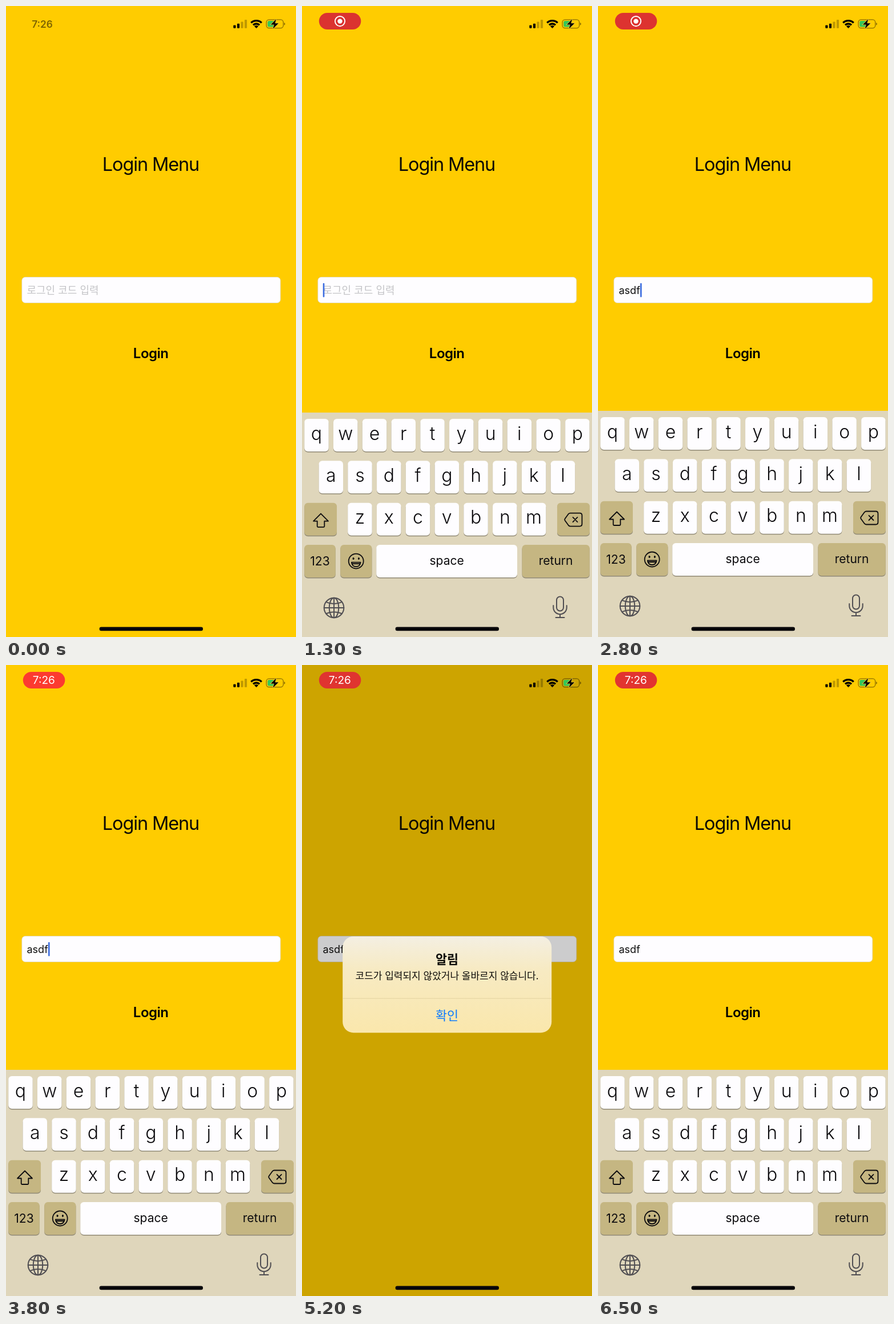
Recreate the animation shown at these times as an HTML page. Size 508x1102 px, loop 6600 ms.

```html
<!DOCTYPE html>
<html lang="ko">
<head>
<meta charset="utf-8">
<title>Login Menu</title>
<style>
  html, body { margin: 0; width: 100%; height: 100%; overflow: hidden; background: #fc0; }
  svg { display: block; width: 508px; height: 1102px; }
  text { font-family: Inter, Roboto, sans-serif; font-optical-sizing: none; }
  .ko { font-family: "Noto Sans CJK KR", "Noto Sans CJK", sans-serif; }
  .mid { text-anchor: middle; }
  .line { fill: none; stroke: #0c0b0e; stroke-width: 1.8; stroke-linejoin: round; stroke-linecap: round; }
  .tool { stroke: #504e52; stroke-width: 2; }
  .letter { font-size: 32px; font-weight: 300; }
  .label { font-size: 21px; }
</style>
</head>
<body>
<svg viewBox="0 0 508 1102">
  <defs>
    <linearGradient id="frost" x2="0" y2="1">
      <stop offset="0" stop-color="#f4efe2"/>
      <stop offset=".35" stop-color="#f7eac2"/>
      <stop offset="1" stop-color="#fae7ac"/>
    </linearGradient>
  </defs>

  <rect width="508" height="1102" fill="#fc0"/>
  <text class="mid" x="253.5" y="288" font-size="32.5" letter-spacing="-.035em" fill="#0c0a05">Login Menu</text>
  <rect x="27.8" y="473.5" width="453" height="45" rx="6" fill="#fefdff" stroke="#dcd6c4" stroke-width=".7"/>
  <text id="hint" class="ko" x="36.5" y="502.5" font-size="18" fill="#c4c4c7">로그인 코드 입력</text>
  <text id="typed" x="36.5" y="503" font-size="18" fill="#111"></text>
  <rect id="caret" y="484" width="2.6" height="24.5" rx="1" fill="#3a6ce0"/>
  <text id="login" class="mid" x="253.7" y="615" font-size="24" font-weight="600" letter-spacing="-.02em">Login</text>

  <rect id="dim" width="508" height="1102"/>

  <g id="keyboard">
    <rect y="707" width="508" height="395" fill="#dfd6bb"/>
    <g id="keys"></g>
    <path class="line" d="M33 883.5 46 896.5H39.3V905.5Q39.3 907 37.8 907H28.2Q26.7 907 26.7 905.5V896.5H20Z"/>
    <path class="line" d="M470 882.5H486.5Q490.5 882.5 490.5 886.5V901.5Q490.5 905.5 486.5 905.5H470Q468.3 905.5 467 904.2L460.6 895.5Q459.6 894 460.6 892.5L467 883.8Q468.3 882.5 470 882.5ZM474.5 889.8 482.5 898M482.5 889.8 474.5 898"/>
    <g class="line">
      <circle cx="94.7" cy="966.5" r="13"/>
      <path d="M86.8 968.5H102.6Q101.5 976 94.7 976T86.8 968.5ZM88 971H101.4"/>
      <ellipse cx="90" cy="962" rx="1" ry="1.7" fill="#0c0b0e" stroke-width="1"/>
      <ellipse cx="99.4" cy="962" rx="1" ry="1.7" fill="#0c0b0e" stroke-width="1"/>
    </g>
    <g class="line tool">
      <circle cx="56" cy="1048" r="17.3"/>
      <ellipse cx="56" cy="1048" rx="8.3" ry="17.3"/>
      <path d="M56 1030.7V1065.3M38.7 1048H73.3M42 1037.8Q56 1044 70 1037.8M42 1058.2Q56 1052 70 1058.2"/>
      <rect x="446" y="1028.5" width="12" height="25" rx="6"/>
      <path d="M440.3 1044V1047.5A11.7 11.7 0 0 0 463.7 1047.5V1044M452 1059.5V1065M444.5 1065H459.5"/>
    </g>
  </g>

  <g id="alert">
    <rect x="71.2" y="474" width="366" height="168.3" rx="19" fill="url(#frost)"/>
    <path d="M71.2 582.3H437.2" stroke="#e3d3a1" stroke-width="1.1"/>
    <text class="ko mid" x="254" y="521.8" font-size="21.8" font-weight="700" fill="#0d0c09">알림</text>
    <text class="ko mid" x="254" y="549.3" font-size="17" fill="#0d0c09">코드가 입력되지 않았거나 올바르지 않습니다.</text>
    <text class="ko mid" x="254" y="620" font-size="21.8" fill="#0a7aff">확인</text>
  </g>

  <text id="clock" class="mid" x="63.5" y="37.5" font-size="17.3" font-weight="600">7:26</text>
  <g id="pill">
    <rect id="pillBg" x="29.8" y="12" width="73.5" height="29" rx="14.5"/>
    <g id="record" fill="#fff">
      <circle cx="66.5" cy="26.6" r="8.6" fill="none" stroke="#fff" stroke-width="1.9"/>
      <circle cx="66.5" cy="26.6" r="4.2"/>
    </g>
    <text id="pillClock" class="mid" x="66.3" y="33.3" font-size="19" fill="#fff">7:26</text>
  </g>

  <g>
    <rect x="398.3" y="33.5" width="4.2" height="5.2" rx="1"/>
    <rect x="404.9" y="30.7" width="4.2" height="8" rx="1"/>
    <rect x="411.4" y="27.4" width="4.2" height="11.3" rx="1" opacity=".25"/>
    <rect x="417.9" y="24" width="4.2" height="14.7" rx="1" opacity=".25"/>
    <g fill="none" stroke="#000" stroke-width="3.4">
      <path d="M429.3 29.4A13.2 13.2 0 0 1 447.7 29.4"/>
      <path d="M433 33.2A7.8 7.8 0 0 1 444 33.2"/>
    </g>
    <path d="M438.5 38.9 435 35.4A5 5 0 0 1 442 35.4Z"/>
    <rect x="456.1" y="23.9" width="29.6" height="14.8" rx="4.6" fill="none" stroke="#000" stroke-width="1.3" opacity=".45"/>
    <path d="M487.1 29V33.7Q488.8 33 488.8 31.3T487.1 29Z" opacity=".5"/>
    <path d="M461 26H469.5V36.6H461Q458.2 36.6 458.2 33.8V28.8Q458.2 26 461 26Z" fill="#34c759"/>
    <path d="M473.2 23 464 32.4H469.8L467.6 39.8 477.2 30.2H471.2Z" stroke="#e9c13c" stroke-width="1.6" paint-order="stroke"/>
  </g>
  <rect x="163.6" y="1084.6" width="181.4" height="6.6" rx="3.3" fill="#08070a"/>
</svg>

<script>
const LOOP = 6600, STEP = 100;
const $ = id => document.getElementById(id);
const clamp = v => Math.min(1, Math.max(0, v));
const set = (id, name, value) => $(id).setAttribute(name, value);
const fade = (id, value) => set(id, "opacity", clamp(value));

// Critically damped spring from 0 to 1; time in ms, rate per second
const spring = (ms, rate) => {
  const x = Math.max(0, ms) * rate / 1000;
  return 1 - (1 + x) * Math.exp(-x);
};

const key = (x, y, w, label = "", dark = false) => {
  const word = label.length > 1;
  const base = y + (label === "123" ? 36 : word ? 34.5 : 36.5);
  return `<rect x="${x}" y="${y + 1.5}" width="${w}" height="57" rx="6" fill="#918a76"/>` +
    `<rect x="${x}" y="${y}" width="${w}" height="57" rx="6" fill="${dark ? "#c5b682" : "#fefdff"}"/>` +
    `<text class="mid ${word ? "label" : "letter"}" x="${x + w / 2}" y="${base}" fill="#0c0b0e">${label}</text>`;
};
const row = (letters, x, y) =>
  [...letters].map((c, i) => key(x + i * 50.77, y, 42.5, c)).join("");

$("keys").innerHTML =
  row("qwertyuiop", 4.2, 718) +
  row("asdfghjkl", 29.5, 791.3) +
  row("zxcvbnm", 80.2, 864.8) +
  key(4.2, 864.8, 56.8, "", true) +
  key(447, 864.8, 57, "", true) +
  key(4.2, 938, 54.5, "123", true) +
  key(67.2, 938, 55.2, "", true) +
  key(130.2, 938, 246.8, "space") +
  key(385.5, 938, 118.3, "return", true);

const WORD = "asdf", PRESSES = [1800, 2100, 2400, 2600];
const SHOW = 4300, HIDE = 5700;

function drawPill(t) {
  fade("clock", .5 - t / 400);
  fade("pill", t / 400);
  const dark = .5 - .5 * Math.cos((t - 5870) / 1900 * 2 * Math.PI);
  set("pillBg", "fill", `rgb(${255 - 39 * dark},${59 - 9 * dark},48)`);
  fade("record", t < 3400 ? 1 : 0);
  fade("pillClock", t < 3400 ? 0 : 1);
}

function drawField(t) {
  const text = WORD.slice(0, PRESSES.filter(p => t >= p).length);
  $("typed").textContent = text;
  fade("hint", text ? 0 : 1);
  set("caret", "x", 36.7 + (text ? $("typed").getComputedTextLength() : 0));
  const editing = t >= 900 && t < SHOW || t >= HIDE;
  const since = t >= HIDE ? t - HIDE : t - Math.max(900, ...PRESSES.filter(p => t >= p));
  fade("caret", editing && since % 1000 < 600 ? 1 : 0);
}

function drawAlert(t) {
  const shown = t < SHOW ? 0 : t < HIDE ? spring(t - 4238, 24) : 1 - spring(t - 5672, 24);
  const scale = t < HIDE ? 1.2 - .2 * shown : 1;
  fade("alert", shown);
  set("alert", "transform", `translate(254 558) scale(${scale}) translate(-254 -558)`);
  fade("dim", .195 * shown);
  fade("login", t >= 4200 && t < 4500 ? .4 : 1);
}

function drawKeyboard(t) {
  const up = t < SHOW ? spring(t - 920, 18.26) : t < HIDE ? 0 : spring(t - 5677, 18.26);
  set("keyboard", "transform", `translate(0 ${395 * (1 - up)})`);
}

function draw(ms) {
  const t = Math.floor((ms % LOOP + .5) / STEP) * STEP % LOOP;
  drawPill(t);
  drawField(t);
  drawAlert(t);
  drawKeyboard(t);
}

const start = performance.now();
const tick = () => {
  draw(performance.now() - start);
  requestAnimationFrame(tick);
};
tick();
</script>
</body>
</html>
```
